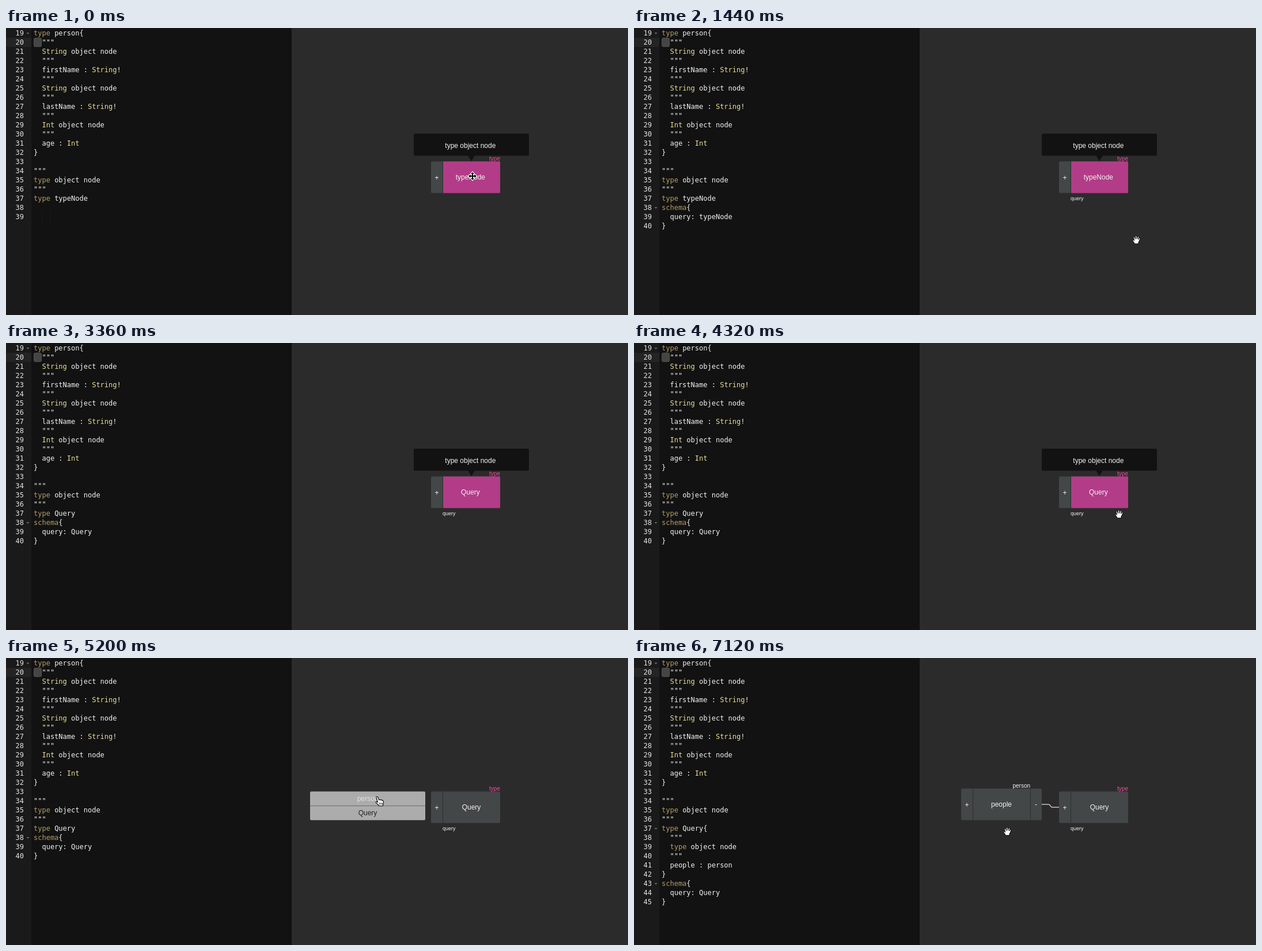
An HTML page for the animation above (7.2 s loop, 1080x500 px).

```html
<!DOCTYPE html>
<html lang="en">
<head>
<meta charset="utf-8">
<title>Schema editor</title>
<style>
  html, body { margin: 0; width: 100%; height: 100%; overflow: hidden; background: #2b2b2b; }
  svg { display: block; width: 1080px; height: 500px; }
  text { font: 12px "Liberation Sans", Arial, sans-serif; fill: #f2f2f2; white-space: pre; }
  .code text { font-family: "DejaVu Sans Mono", monospace; }
  .num { text-anchor: end; fill: #e4e4e4; }
  .kw { fill: #b39d68; }
  .scalar { fill: #ebdf97; }
  .mid { text-anchor: middle; }
  .menu text { fill: #242424; }
  .menu .hot { fill: #e2e2e2; }
  .tag { font-size: 10px; text-anchor: end; }
  .role { font-size: 9px; }
</style>
</head>
<body>
<svg viewBox="0 0 1080 500" xmlns="http://www.w3.org/2000/svg">
  <defs>
    <g id="move">
      <path d="M0-7 3-3.5H1V-1H3.5V-3L7 0 3.5 3V1H1V3.5H3L0 7-3 3.5H-1V1H-3.5V3L-7 0-3.5-3V-1H-1V-3.5H-3Z"
        fill="#000" stroke="#fff" stroke-width="2.4" paint-order="stroke"/>
    </g>
    <g id="point" stroke="#000" stroke-linejoin="round" transform="translate(-.5 0) scale(1.1)">
      <path fill="#fff" d="M-4.5-7q1.5-1.5 2.8 0l1.8 4.5q1.5-1 2.4.2q1.5-.7 2.2.5q1.8-.4 2.2 1.2q.6 3-.4 5l-.3 2.6h-6q-1-2-4.2-4.4q-1.6-1.6.2-2.2q1-.2 2.2.9z"/>
      <path stroke-width=".8" d="M1 2v3M3 2v3M5 2v3"/>
    </g>
    <g id="grab" stroke="#000" stroke-linejoin="round">
      <path fill="#fff" d="M-3 7q-.3-2-2.3-4.2q-1.8-2.3-.8-2.9q1.2-.6 2.6 1.5l-1.2-5q-.2-1.6.9-1.7q1.1 0 1.5 1.5l.8 2.6l-.1-4.3q.1-1.5 1.2-1.5q1.1 0 1.3 1.5l.3 4l.9-3.4q.5-1.3 1.5-1q1 .3.8 1.6l-.6 3.6l.9-1.7q.7-1.1 1.5-.7q.8.4.5 1.6q-1.4 3.8-2.6 5.6l-.2 2.8z"/>
    </g>
  </defs>
  <rect width="1080" height="500" fill="#2b2b2b"/>
  <rect width="496" height="500" fill="#121212"/>
  <rect width="44" height="500" fill="#1a1a1a"/>
  <rect y="17" width="44" height="16" fill="#242424"/>
  <rect x="48.5" y="17.5" width="13" height="15" rx="2" fill="#454545" stroke="#505050"/>
  <g class="code" id="code"></g>
  <g id="graph"></g>
  <use id="cursor"/>
</svg>
<script>
const LOOP = 7200, STEP = 80, BLINK = 1040;
const MENU = [480, 1200], PICK = [4640, 5280], DESELECT = [4400, 7040];
const $ = id => document.getElementById(id);
const within = (t, [a, b]) => t >= a && t < b;

// Text of the name field of each node, by the time it is entered.
const firstName = [
  [0, 'typeNode'], [1680, 'typeNod'], [1760, 'typeN'], [1840, 'typ'], [1920, 't'], [2000, ''],
  [2080, 'q'], [2160, 'qu'], [2240, 'que'], [2320, 'quer'], [2400, 'query'],
  [2560, 'que'], [2640, 'q'], [2720, ''],
  [2880, 'Q'], [2960, 'Qu'], [3040, 'Que'], [3120, 'Quer'], [3200, 'Query']
];
const secondName = [
  [0, 'typeNode'], [6000, 'typeNod'], [6080, 'typeN'], [6160, 'typ'], [6240, 't'], [6320, ''],
  [6400, 'p'], [6560, 'pe'], [6640, 'peo'], [6720, 'peop'], [6800, 'peopl'], [6960, 'people']
];

// Pointer track: time, x, y, shape.
const track = [
  [0, 810, 258, 'move'], [160, 810, 258, 'move'], [400, 808, 275, 'move'],
  [480, 810, 281, 'point'], [960, 872, 369, 'point'], [1200, 872, 369, 'grab'],
  [1520, 872, 369, ''], [4080, 872, 369, 'grab'], [4320, 842, 298, 'grab'],
  [4400, 842, 298, 'grab'], [4480, 810, 284, 'move'], [4640, 748, 264, 'point'],
  [4800, 715, 256, 'point'], [5120, 648, 250, 'point'], [5280, 648, 250, 'move'],
  [5760, 648, 250, ''], [6960, 648, 264, 'move'], [7040, 648, 292, 'grab'], [7120, 648, 302, 'grab']
];

const last = (list, t) => list.reduce((i, k, n) => k[0] <= t ? n : i, 0);
const textAt = (list, t) => list[last(list, t)][1];

function pointer(t) {
  const i = last(track, t), a = track[i], b = track[i + 1] || a;
  const k = b === a ? 0 : (t - a[0]) / (b[0] - a[0]);
  return { x: a[1] + (b[1] - a[1]) * k, y: a[2] + (b[2] - a[2]) * k, shape: a[3] };
}

const rect = (x, y, w, h, fill, rx = 0) =>
  `<rect x="${x}" y="${y}" width="${w}" height="${h}" rx="${rx}" fill="${fill}"/>`;
const label = (x, y, s, cls, extra = '') => `<text x="${x}" y="${y}" class="${cls}" ${extra}>${s}</text>`;

function codeLines(t, first, second) {
  const doc = ['"""', 'type object node', '"""'];
  const field = (kind, decl) => ['  """', `  ${kind} object node`, '  """', '  ' + decl];
  const lines = [
    'type person{',
    ...field('String', 'firstName : String!'),
    ...field('String', 'lastName : String!'),
    ...field('Int', 'age : Int'),
    '}', '', ...doc
  ];
  if (t >= PICK[1]) lines.push(`type ${first}{`, ...field('type', second + ' : person'), '}');
  else lines.push('type ' + first);
  if (t >= MENU[1]) lines.push('schema{', '  query: ' + first, '}');
  else lines.push('', '');
  return lines;
}

const paint = s => s
  .replace(/\b(String|Int)\b/g, '<tspan class="scalar">$1</tspan>')
  .replace(/^( *)(type|schema)(?=[ {])/, '$1<tspan class="kw">$2</tspan>')
  .replace(/^ +/, m => '\u00a0'.repeat(m.length));

function drawCode(lines) {
  return lines.map((s, i) => {
    const y = 13 + 16 * i;
    let out = label(31, y, 19 + i, 'num') + label(48, y, paint(s), '');
    if (s.endsWith('{')) out += `<path d="M35.5 ${y - 5}h5l-2.5 3z" fill="#686868"/>`;
    return out;
  }).join('') + (lines[19] ? '' : rect(62, 321, 1, 15, '#1c1c1c') + rect(76, 321, 1, 15, '#1c1c1c'));
}

function node({ x, y, name, tag, tagFill, selected, caret, out }) {
  const grey = '#434748', edge = '#2c2f30', mid = x + 50;
  const fieldText = selected ? name + (caret ? '|' : '\u00a0') : name;
  let s = rect(x - 20, y, out ? 140 : 120, 55, grey, 2)
    + rect(x, y, 1, 55, edge)
    + (out ? rect(x + 100, y, 1, 55, edge) : '')
    + (selected ? rect(x + 1, y, 99, 55, '#b33c88', out ? 0 : 1) : '')
    + label(x - 10, y + 32.5, '+', 'mid')
    + (out ? label(x + 110, y + 31.5, '-', 'mid') : '')
    + label(mid, y + 31.5, fieldText, 'mid');
  if (selected) {
    s += rect(x - 50, y - 48.5, 200, 38.5, '#121212', 2)
      + `<path d="M${mid - 6} ${y - 10.5}h12l-6 10z" fill="#121212"/>`
      + label(mid, y - 24, 'type object node\u00a0', 'mid');
  }
  return s + label(x + 100, y - 2, tag, 'tag', `style="fill:${tagFill}"`);
}

function menu(x, y, items, p) {
  const tipX = p.x - 3, tipY = p.y - 7;
  const hot = tipX >= x && tipX < x + 200 ? Math.floor((tipY - y) / 25) : -1;
  return '<g class="menu">' + rect(x, y, 200, items.length * 25, '#acacac', 2)
    + items.map((s, i) =>
      (i ? rect(x, y + 25 * i - 0.5, 200, 1, '#6c6c6c') : '')
      + label(x + 100, y + 25 * i + 16.5, s, 'mid' + (i === hot ? ' hot' : ''))).join('') + '</g>';
}

function draw(t) {
  const first = textAt(firstName, t), second = textAt(secondName, t);
  const caret = t % BLINK >= BLINK / 2;
  const p = pointer(t);
  const added = t >= PICK[1], active = within(t, [PICK[1], DESELECT[1]]);

  $('code').innerHTML = drawCode(codeLines(t, first, second));

  let s = '';
  if (added) {
    s += `<path d="M708 255H719q3 0 4 2.5t4 2.5H738" fill="none" stroke="${active ? '#66e8bd' : '#c4c4c4'}" stroke-width="${active ? 2 : 1.5}"/>`;
  }
  s += node({ x: 758, y: 232.5, name: first, tag: 'type', tagFill: '#f84ba6', selected: t < DESELECT[0], caret });
  if (t >= MENU[1]) s += label(758, 300, 'query', 'role');
  if (added) {
    s += node({ x: 588, y: 227.5, name: second, tag: 'person', tagFill: '#f2f2f2', selected: active, caret, out: true });
  }
  if (within(t, MENU)) {
    s += menu(808, 276, ['delete', 'renameDescription', 'beautify graph', 'query', 'mutation', 'subscription'], p);
  }
  if (within(t, PICK)) s += menu(528, 232.5, ['person', 'Query'], p);
  $('graph').innerHTML = s;

  $('cursor').setAttribute('href', '#' + (p.shape || 'none'));
  $('cursor').setAttribute('transform', `translate(${p.x} ${p.y})`);
}

let shown = -1;
const start = performance.now();
function tick() {
  const t = Math.floor((performance.now() - start) % LOOP / STEP) * STEP;
  if (t !== shown) draw(shown = t);
  requestAnimationFrame(tick);
}
tick();
</script>
</body>
</html>
```
